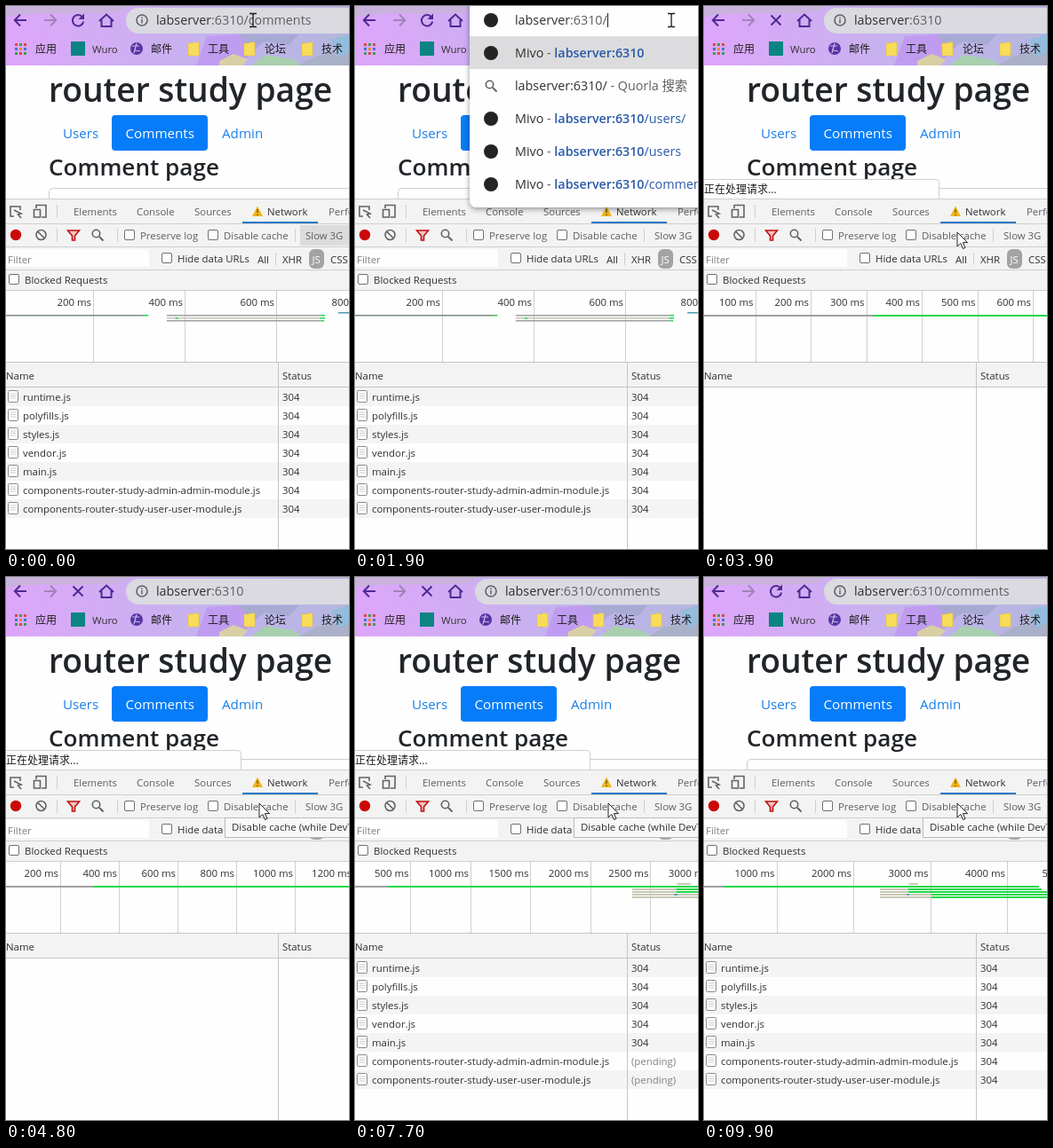
Recreate the animation shown at these times as an HTML page. Size 386x612 px, loop 10000 ms.

```html
<!DOCTYPE html>
<html lang="en">
<head>
<meta charset="utf-8">
<title>Router study</title>
<style>
  html, body { margin: 0; width: 100%; height: 100%; overflow: hidden; background: #fefefe; }
  svg { display: block; width: 386px; height: 612px; }
  text { font: 11.4px "Open Sans", "Noto Sans CJK SC", "Noto Sans CJK", sans-serif; fill: #303030; white-space: pre; }
  .zh { font-size: 12px; fill: #1c1c1c; }
  .url { font-size: 14.3px; }
  .soft { fill: #5c5f62; }
  .dim { fill: #808080; }
  .link { font-size: 15.2px; fill: #1a7fe8; }
  .head { font-weight: 600; fill: #212529; }
  .host { fill: #2a5aa8; font-weight: 600; }
  .path { fill: #2a5aa8; }
  .end { text-anchor: end; }
  .line { stroke: #cfcfcf; fill: none; }
  .icon { fill: none; stroke: #4d2a94; stroke-width: 2; }
  .tool { fill: none; stroke: #606366; stroke-width: 1.6; }
  .box { fill: #fff; stroke: #707070; }
</style>
</head>
<body>
<svg viewBox="0 0 386 612">
  <defs>
    <filter id="shadow" x="-10%" y="-10%" width="120%" height="120%">
      <feDropShadow dx="0" dy="2" stdDeviation="3" flood-opacity=".4"/>
    </filter>
    <linearGradient id="sky">
      <stop offset="0" stop-color="#dda6fb"/>
      <stop offset=".36" stop-color="#cfaef2"/>
      <stop offset=".7" stop-color="#bfb4ec"/>
      <stop offset="1" stop-color="#b4b6dc"/>
    </linearGradient>
    <rect id="check" class="box" width="11" height="11" rx="1.5"/>
    <path id="folder" d="M0 1H5L7 0H12V15H0Z" fill="#f8dc58" stroke="#e3c248" stroke-width=".6"/>
    <g id="file">
      <rect x=".5" y=".5" width="11" height="13" rx="1" fill="#fff" stroke="#8a8a8a"/>
      <path d="M3 4H9M3 6.500H9M3 9H9" stroke="#cacaca"/>
    </g>
    <g id="lens" class="tool"><circle cx="-1.500" cy="-1.500" r="4.200"/><path d="M2 2L6.500 6.500" stroke-width="2"/></g>
  </defs>

  <!-- web page -->
  <rect width="386" height="612" fill="#fefefe"/>
  <g data-on="0-5400 7200-10000">
    <text class="head" x="48" y="108" style="font-size:37.2px">router study page</text>
    <text class="link" x="64" y="149">Users</text>
    <rect x="119" y="123" width="108" height="40" rx="4" fill="#067cf8"/>
    <text class="link" x="134.500" y="149" style="fill:#fff">Comments</text>
    <text class="link" x="243" y="149">Admin</text>
    <text class="head" x="48" y="191" style="font-size:26.1px">Comment page</text>
    <rect class="line" x="48.500" y="205.500" width="400" height="40" rx="4"/>
  </g>

  <!-- browser bars -->
  <rect width="386" height="67" fill="url(#sky)"/>
  <path d="M0 0H140L128 6C90 12 50 4 0 12Z" fill="#c9b2dc"/>
  <path d="M226 34L262 32 284 46 262 67H214Z" fill="#c09cf0"/>
  <path d="M262 32L330 32 318 44 292 40 276 50Z" fill="#a8aad4"/>
  <path d="M276 67L292 55 322 60 334 67Z" fill="#a8cfae"/>
  <path d="M330 67L350 56 386 50V67Z" fill="#aab0c8"/>
  <path d="M366 38L386 32V52L374 58Z" fill="#94bcdc"/>
  <path d="M240 62L256 54 272 60 266 67H240Z" fill="#d8d0a4"/>

  <path class="icon" d="M23 16H10M16 9.500L9.800 16L16 22.500"/>
  <path class="icon" d="M43 16H56M50 9.500L56.200 16L50 22.500" style="stroke:#a084b8"/>
  <g data-on="0-2700 9300-10000">
    <path class="icon" d="M86 12.500A6.200 6.200 0 1 0 87.200 17.500"/>
    <path d="M88 8.500V15H81.500Z" fill="#4d2a94"/>
  </g>
  <path class="icon" d="M75.500 10.500L86.500 21.500M86.500 10.500L75.500 21.500" data-on="2700-9300"/>
  <path class="icon" d="M105 17L113 9.500L121 17M107.500 15.500V23H118.500V15.500"/>
  <rect x="135" y="2" width="270" height="29" rx="14.500" fill="#dadae0"/>
  <circle class="tool" cx="153" cy="16" r="6" stroke-width="1.300"/>
  <path d="M153 15V19.500M153 12.500V14" stroke="#606366" stroke-width="1.500"/>
  <text class="url" x="169" y="21">labserver<tspan class="soft">:6310<tspan data-on="0-1100 7200-10000">/comments</tspan></tspan></text>

  <g id="apps"></g>
  <text class="zh" x="33" y="53">应用</text>
  <rect x="73" y="40" width="16" height="16" fill="#0c8484"/>
  <text x="97" y="53">Wuro</text>
  <circle cx="147" cy="48" r="7" fill="#5634a4"/>
  <path d="M142 45H150M145 50L151 51M147 42L144 53" stroke="#cdbcea" stroke-width="1.200"/>
  <text class="zh" x="163" y="53">邮件</text>
  <use href="#folder" x="205" y="41"/><text class="zh" x="227" y="53">工具</text>
  <use href="#folder" x="268" y="41"/><text class="zh" x="291" y="53">论坛</text>
  <use href="#folder" x="333" y="41"/><text class="zh" x="355" y="53">技术</text>

  <!-- loading bubble -->
  <g data-on="2700-9300">
    <path class="line" d="M-1 195.500H261Q264.500 195.500 264.500 199V218H-1Z" style="fill:#fefefe"/>
    <text class="zh" x="0" y="211" data-on="2700-3200">正在连接...</text>
    <text class="zh" x="0" y="211" data-on="3200-9300">正在处理请求...</text>
  </g>

  <!-- inspector -->
  <rect y="217" width="386" height="104" fill="#f3f3f3"/>
  <path class="line" d="M0 217.500H386M0 245.500H386M0 271.500H386M0 297.500H386M0 320.500H386"/>
  <path class="tool" d="M16 230V226H5V237H9M9 230L17 234L13.500 235L17 239" stroke-width="1.300"/>
  <path class="tool" d="M34 228V224.500H45V238H40M31.500 229.500H38.500V238H31.500Z" stroke-width="1.300"/>
  <path class="line" d="M57.500 224V239M57.500 251V266M125.500 251V266M325.500 251V266M303.500 278V292"/>
  <text class="soft" x="76" y="236">Elements</text>
  <text class="soft" x="147" y="236">Console</text>
  <text class="soft" x="212" y="236">Sources</text>
  <path d="M283 225.500L289 237H277Z" fill="#f2b51c"/>
  <path d="M283 229V233M283 234.500V236" stroke="#5b4a10" stroke-width="1.200"/>
  <text x="294" y="236">Network</text>
  <rect x="266" y="243" width="85" height="2" fill="#2c78c4"/>
  <text class="soft" x="363" y="236">Performance</text>

  <circle cx="11" cy="258" r="6.200" fill="#cb0808"/>
  <circle class="tool" cx="39.500" cy="258" r="5.500"/><path class="tool" d="M35.700 254.200L43.300 261.800"/>
  <path d="M69.500 253H82.500L77.500 259V264H74.500V259Z" fill="#f3c4c0" stroke="#c01010" stroke-width="1.600"/>
  <use href="#lens" x="103" y="258"/>
  <use href="#check" x="133.500" y="252.500"/><text class="soft" x="151" y="263">Preserve log</text>
  <use href="#check" x="227.500" y="252.500"/><text class="soft" x="245" y="263">Disable cache</text>
  <rect x="331" y="247" width="60" height="23" fill="#dcdcdc" data-on="0-200"/>
  <text class="soft" x="337" y="263">Slow 3G</text>

  <rect y="274" width="161" height="20" fill="#fefefe"/>
  <text class="dim" x="2" y="290">Filter</text>
  <use href="#check" x="175.500" y="278.500"/><text x="193" y="289">Hide data URLs</text>
  <text x="283" y="290">All</text>
  <text x="311" y="290">XHR</text>
  <rect x="341" y="274" width="17" height="22" rx="6" fill="#a3a3a3"/>
  <text x="344.500" y="290" style="fill:#fff">JS</text>
  <text x="365" y="290">CSS</text>
  <use href="#check" x="3.500" y="302.500"/><text x="21" y="313">Blocked Requests</text>

  <rect y="321" width="386" height="81" fill="#fefefe"/>
  <g id="chart"></g>

  <rect y="402" width="386" height="28" fill="#f3f3f3"/>
  <g id="rows"></g>
  <path class="line" d="M0 401.500H386M0 429.500H386M306.500 402V612" style="stroke:#c4c4c4"/>
  <text x="0" y="421">Name</text><text x="311" y="421">Status</text>

  <g data-on="4300-10000">
    <rect x="246.500" y="271.500" width="160" height="22" fill="#f8f8f8" stroke="#bcbcbc"/>
    <text x="254" y="286">Disable cache (while DevTools</text>
  </g>

  <!-- address suggestions -->
  <g data-on="1100-2700">
    <rect x="129" y="-12" width="300" height="239" rx="8" fill="#fefefe" filter="url(#shadow)"/>
    <rect x="129" y="34" width="257" height="37" fill="#dcdcde"/>
    <text class="url" x="180" y="21">labserver<tspan class="soft">:6310/</tspan></text>
    <path d="M284.500 8V24" stroke="#222"/>
    <use href="#lens" x="153" y="90"/>
    <text class="url" x="180" y="95">labserver:6310/<tspan class="soft"> - Quorla 搜索</tspan></text>
    <g id="hints"></g>
  </g>

  <path id="beam" d="M-4 -7.500H-1L0 -6.500L1 -7.500H4M0 -6.500V6.500M-4 7.500H-1L0 6.500L1 7.500H4" fill="none" stroke="#1c1c1c" stroke-width="1.300"/>
  <path id="arrow" d="M0 0V16L3.800 12.500L6.500 18.500L9 17.400L6.400 11.600H11.500Z" fill="#fff" stroke="#222"/>
</svg>

<script>
const LOOP = 10000, STEP = 100;
const ENTER = 2700, CLEAR = 3200, DONE = 9300;
const $ = id => document.getElementById(id);
const range = n => [...Array(n).keys()];

const hues = ['#d94a3c', '#e88a2a', '#3c9c58', '#3c78d0'];
$('apps').innerHTML = range(9).map(i =>
  `<rect x="${10 + i % 3 * 5}" y="${42 + (i / 3 | 0) * 5}" width="3" height="3" fill="${hues[(i * 2 + (i / 3 | 0)) % 4]}"/>`).join('');

const hint = (y, path) => `<text class="url" x="180" y="${y}">Mivo<tspan class="soft"> - </tspan>` +
  `<tspan class="host">labserver:6310</tspan><tspan class="path">${path}</tspan></text>`;
$('hints').innerHTML = hint(58, '') + hint(132, '/users/') + hint(169, '/users') + hint(206, '/comments') +
  [16, 53, 127, 164, 201].map(y => `<circle cx="153" cy="${y}" r="8" fill="#242424"/>`).join('');

// name, time listed, time answered
const files = [
  ['runtime.js', 5300, 6200],
  ['polyfills.js', 5300, 6400],
  ['styles.js', 5300, 6800],
  ['vendor.js', 5300, 6900],
  ['main.js', 5300, 7000],
  ['components-router-study-admin-admin-module.js', 7200, DONE],
  ['components-router-study-user-user-module.js', 7200, DONE]
];
$('rows').innerHTML = files.map(([name, listed, done], i) => {
  const y = 430 + i * 21;
  return `<g data-on="0-${CLEAR} ${listed}-${LOOP}">
    <rect y="${y}" width="386" height="21" fill="${i % 2 ? '#fefefe' : '#f4f4f4'}"/>
    <use href="#file" x="2" y="${y + 3}"/><text x="19" y="${y + 15}">${name}</text>
    <text x="311" y="${y + 15}" data-on="0-${CLEAR} ${done}-${LOOP}">304</text>
    <text class="dim" x="311" y="${y + 15}" data-on="${listed}-${done}">(pending)</text></g>`;
}).join('');

// Request bars: from ms, to ms, y, colour
const GREEN = '#1fd84a', PALE = '#c6c8b4', GREY = '#a0a0a0', TEAL = '#4c9cae';
const before = [
  [0, 311, 349, '#7c8c7c'], [311, 321, 349, GREEN],
  [361, 698, 349, GREY], [361, 698, 352, PALE], [361, 698, 355, GREY],
  [380, 386, 352, GREEN],
  [698, 707, 349, GREEN], [696, 707, 352, GREEN], [698, 705, 355, GREEN],
  [736, 1000, 346, TEAL]
];
const after = [
  [0, 312, 349, GREY], [312, 4416, 349, GREEN],
  [2347, 2715, 352, PALE], [2715, 4450, 352, GREEN],
  [2347, 2715, 355, PALE], [2715, 4800, 355, GREEN],
  [2347, 3017, 358, PALE], [3017, 4900, 358, GREEN],
  [2347, 3017, 361, PALE], [3017, 4900, 361, GREEN],
  [2700, 2725, 358, TEAL],
  [2722, 2840, 346, PALE]
];

// Linear track through [time, ...values]
function track(points, t) {
  const i = points.findIndex(p => p[0] > t);
  if (i < 0) return points.at(-1).slice(1);
  const a = points[i - 1], b = points[i], k = (t - a[0]) / (b[0] - a[0]);
  return a.slice(1).map((v, j) => v + (b[j + 1] - v) * k);
}

// Milliseconds per pixel of the chart; the window grows while requests run
const growth = [[CLEAR, 1.6], [3900, 1.6], [4800, 3.03], [6600, 5.93], [7700, 7.41], [8000, 7.9]];
const zoom = t => t < ENTER ? 1.942 : t < CLEAR ? 35.2 : t < DONE ? track(growth, t)[0] : 11.56;

const pointer = [[0, 278, 16], [100, 278, 16], [900, 356, 16], [2200, 356, 16], [2400, 326, 18],
  [2900, 326, 18], [3700, 285, 255]];

function gridStep(ms) {
  for (let p = 10; ; p *= 10)
    for (const m of [1, 2, 5]) if (m * p / ms >= 60) return m * p;
}

function drawChart(t) {
  const ms = zoom(t), x = v => v / ms - 5, step = gridStep(ms);
  let out = '';
  for (let v = step; x(v) < 450; v += step)
    out += `<path class="line" d="M${Math.round(x(v)) + .5} 321V401"/>` +
      `<text class="end" x="${x(v) - 2}" y="338">${v} ms</text>`;
  const old = t < CLEAR;
  for (const [a, b, y, fill] of old ? before : after)
    out += `<rect x="${x(a)}" y="${y - 1}" width="${(b - a) / ms}" height="${old ? 1.5 : 2}" fill="${fill}"/>`;
  if (old) out += `<path d="M${x(985)} 341V401" stroke="#2a68a0" stroke-width="1.3"/>` +
    `<path d="M${x(1126)} 341V401" stroke="#4c4444"/>`;
  $('chart').innerHTML = out;
}

const timed = [...document.querySelectorAll('[data-on]')].map(el =>
  [el, el.dataset.on.split(' ').map(s => s.split('-').map(Number))]);
const show = (el, on) => el.style.display = on ? '' : 'none';

let last = -1;
function frame() {
  const t = Math.floor(performance.now() % LOOP / STEP) * STEP;
  if (t !== last) {
    last = t;
    for (const [el, spans] of timed) show(el, spans.some(([a, b]) => t >= a && t < b));
    drawChart(t);
    const [x, y] = track(pointer, t);
    for (const id of ['beam', 'arrow']) $(id).setAttribute('transform', `translate(${x} ${y})`);
    show($('beam'), y < 33);
    show($('arrow'), y >= 33);
  }
  requestAnimationFrame(frame);
}
frame();
</script>
</body>
</html>
```
